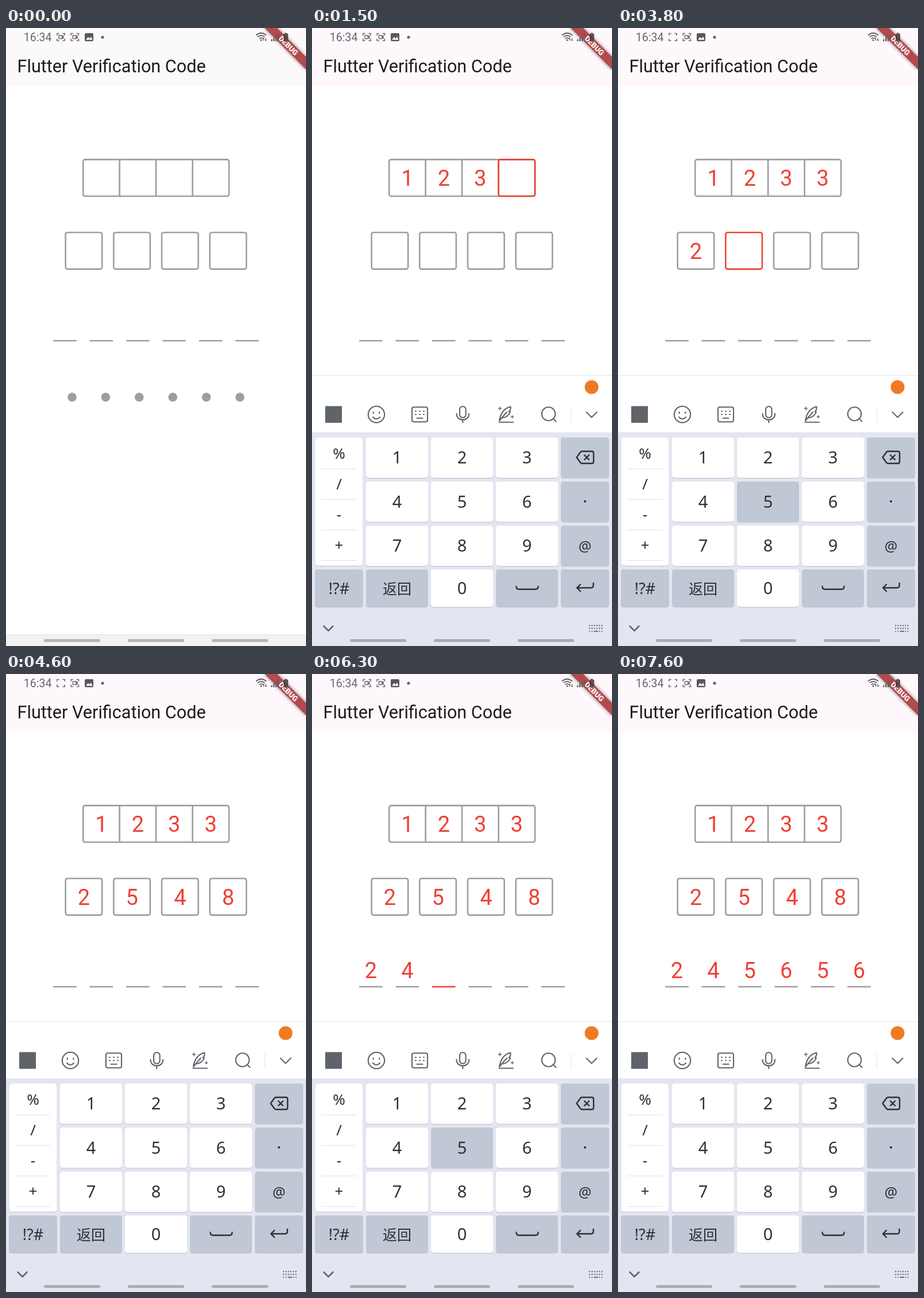
An HTML page for the animation above (8000 ms loop, 522 by 1073 pixels).

```html
<!DOCTYPE html>
<html lang="en">
<head>
<meta charset="utf-8">
<title>Flutter Verification Code</title>
<style>
html, body { margin: 0; height: 100%; overflow: hidden; background: #fff; }
svg { display: block; width: 100vw; height: 100vh; }
text { font-family: Roboto, sans-serif; }
.line { fill: none; stroke: #9e9e9e; stroke-width: 2.6; }
.focus { stroke: #ef4335; }
.code { font-size: 38px; fill: #ef4036; text-anchor: middle; }
.key { font: 29px "Noto Sans", sans-serif; fill: #2c2f36; text-anchor: middle; }
.han { font: 25px "Noto Sans CJK SC", "Noto Sans CJK", sans-serif; }
.icon { fill: none; stroke: #5f636a; stroke-width: 2.1; stroke-linecap: round; stroke-linejoin: round; }
.dark { stroke: #2c2f36; stroke-width: 2.4; }
</style>
</head>
<body>
<svg viewBox="0 0 522 1073" preserveAspectRatio="none">
  <defs>
    <filter id="blur" x="-20%" y="-100%" width="140%" height="300%"><feGaussianBlur stdDeviation="3"/></filter>
    <path id="corners" d="M88.8 13V9.5H92.5M98.5 9.5H102.2V13M102.2 18.5V22H98.5M92.5 22H88.8V18.5" fill="none" stroke="#6b6769" stroke-width="1.5"/>
    <path id="camera" d="M92 13H97.3V18.6H92ZM97.5 15.2L100 13.5V18L97.5 16.4" fill="none" stroke="#6b6769" stroke-width="1.4"/>
  </defs>
  <rect width="522" height="1073" fill="#fff"/>
  <rect id="bar" width="522" height="101"/>
  <text x="19.6" y="77" font-size="30.6" fill="#1d1b1e">Flutter Verification Code</text>

  <g transform="translate(522 0) rotate(45)">
    <rect x="-51" y="35.6" width="102" height="15.2" fill="#000" opacity=".5" filter="url(#blur)"/>
    <rect x="-75" y="35.6" width="150" height="15.2" fill="#b34a4c"/>
    <text y="47.9" font-size="13" font-weight="900" fill="#fff" text-anchor="middle">DEBUG</text>
  </g>

  <text x="30.8" y="23" font-size="19.5" fill="#69656a">16:34</text>
  <use href="#corners"/><use id="blink" href="#camera"/>
  <use href="#corners" x="24.3"/><use href="#camera" x="24.3"/>
  <rect x="137" y="9" width="15" height="14" rx="2" fill="#5a565a"/>
  <path d="M139 20.5L143 15.5L145.5 18.5L148 15L150.5 20.5Z" fill="#fff"/>
  <circle cx="168" cy="16" r="2.6" fill="#69656a"/>
  <g fill="none" stroke="#625e62" stroke-width="1.7">
    <path d="M435 12.5Q444 5 453 12.5M437.7 15.7Q444 10.3 450.3 15.7M440.5 18.7Q444 15.7 447.5 18.7"/>
    <path d="M448.6 22V17.5M447 19L448.6 17.2M452 17.5V22M453.6 20.5L452 22.2" stroke-width="1.3"/>
    <path d="M462.3 23V19.5M466.2 23V16.5M470.1 23V13M474 23V9.5" stroke-width="2.3"/>
  </g>
  <circle cx="444" cy="21" r="1.6" fill="#625e62"/>
  <path d="M485 8.5H489V10H491V23.5H483V10H485Z" fill="#4a3a3e" opacity=".85"/>

  <g id="fields"></g>
  <rect y="1053" width="522" height="20" fill="#f2f2f2"/>
  <path d="M0 1053.5H522" stroke="#e2e2e2"/>

  <g id="keyboard">
    <rect y="603" width="522" height="99" fill="#fff"/>
    <path d="M0 603.5H522M450.5 659V684" stroke="#e3e4e7"/>
    <rect y="702" width="522" height="400" fill="#e3e6f0"/>
    <circle cx="486.5" cy="623.5" r="12" fill="#f07a24"/>
    <rect x="23" y="656.5" width="29" height="29" fill="#5f636a"/>
    <g class="icon">
      <circle cx="112" cy="671" r="14.2"/>
      <path d="M106.7 667V669M117.3 667V669M106 675.5Q112 682 118 675.5"/>
      <rect x="174" y="658.3" width="27" height="25.5" rx="3"/>
      <path d="M180 665.5H181M187 665.5H188M194 665.5H195M180 671H181M187 671H188M194 671H195M182.5 677.5H192.5"/>
      <rect x="257" y="657" width="10.6" height="19.5" rx="5.3"/>
      <path d="M251.5 669.5C251.5 684 273.2 684 273.2 669.5M262.3 680.5V685"/>
      <path d="M325.5 684.5H350M326 682C328 669 335 660 345.5 657.5C346 661 345 664 342.5 666L345 666.5C343 672 338 676.5 330 677M326 682C331 676 335 671 339 667"/>
      <path d="M327 658V663M324.5 660.5H329.5M348.5 673V677M346.5 675H350.5" stroke-width="1.5"/>
      <circle cx="411.5" cy="670" r="11.7"/>
      <path d="M420 678.5L424.5 683M477.5 667L486.5 676L495.5 667"/>
      <path d="M20.5 1038.5L28.5 1046.5L36.500 1038.5" stroke-width="2.5"/>
      <path d="M483 1037.500H505M483 1042.500H505" stroke-width="2.3" stroke-dasharray="0 4.3"/>
      <path d="M483 1047.500H483.100M487.300 1047.500H487.400M491.500 1047.500H497M500.300 1047.500H500.400M504.500 1047.500H504.600" stroke-width="2"/>
    </g>
    <g id="keys"></g>
    <path d="M17 765.5H77M17 818.5H77M17 871.5H77M17 924.5H77" stroke="#e1e2e5"/>
    <g class="icon dark">
      <path d="M460.500 745.500L467 736.500Q468 735 470 735H487Q490 735 490 738V753Q490 756 487 756H470Q468 756 467 754.500ZM474 741.500L482 749.500M482 741.500L474 749.500"/>
      <path d="M355.500 969.500Q355.500 974.500 360 974.500H389Q393.500 974.500 393.500 969.500"/>
      <path d="M489.500 964V968Q489.500 972 485.500 972H461M467 966L461 972L467 978"/>
    </g>
    <circle cx="475" cy="822" r="2.1" fill="#2c2f36"/>
  </g>
  <g id="pills"></g>
</svg>
<script>
const $ = id => document.getElementById(id);
const LOOP = 8000;
// Typed digits per field: [digit, press time, release time]
const typing = [
  [[1, 900, 1000], [2, 1200, 1300], [3, 1400, 1500], [3, 1600, 1700]],
  [[2, 3600, 3700], [5, 3800, 3900], [4, 4100, 4200], [8, 4300, 4400]],
  [[2, 5800, 5900], [4, 6100, 6200], [5, 6300, 6400], [6, 6500, 6600], [5, 6800, 7000], [6, 7200, 7300]]
];
const range = n => [...Array(n).keys()];
const label = (x, y, s, cls) => `<text class="${cls}" x="${x}" y="${y}">${s}</text>`;
const box = (x, y, w, cls) => `<rect class="${cls}" x="${x}" y="${y}" width="${w}" height="63.6" rx="3.5"/>`;
const dash = (x, cls) => `<path class="${cls}" d="M${x} 543h40.6"/>`;

function key(x, y, w, h, fill, s = '', id = '', cls = 'key') {
  return `<rect x="${x}" y="${y + 1.3}" width="${w}" height="${h}" rx="4.5" fill="#c3c8d4"/>
    <rect ${id && `id="${id}"`} x="${x}" y="${y}" width="${w}" height="${h}" rx="4.5" fill="${fill}"/>`
    + label(x + w / 2, y + h / 2 + 10.3, s, cls);
}

function buildKeys() {
  const gray = '#c0c7d5', white = '#fff';
  let out = key(6, 711, 82, 222.5, white);
  ['%', '/', '-', '+'].forEach((s, i) => out += label(47, 748 + i * 53, s, 'key" style="font-size:26px'));
  for (let n = 1; n < 10; n++) {
    const c = (n - 1) % 3, r = (n - 1) / 3 | 0;
    out += key(94 + 113 * c, 711 + 76.5 * r, 108, 70, white, n, 'k' + n);
  }
  ['', '', '@'].forEach((s, r) => out += key(433, 711 + 76.5 * r, 84, 70, gray, s, '', 'key" style="font-size:25px'));
  out += key(5, 940, 84, 65, gray, '!?#', '', 'key" style="font-size:27px');
  out += key(94, 940, 108, 65, gray, '返回', '', 'key han');
  out += key(207, 940, 108, 65, white, 0);
  out += key(320, 940, 108, 65, gray);
  out += key(433, 940, 84, 65, gray);
  $('keys').innerHTML = out;
  $('pills').innerHTML = range(3).map(i =>
    `<rect x="${66 + 146 * i}" y="1061" width="98" height="5" rx="2.500"/>`).join('');
}

function drawFields(t) {
  const count = typing.map(row => row.filter(d => t >= d[2]).length);
  const active = typing.map((row, i) =>
    count[i] < row.length && (count[i] || (i === 0 && t >= 100)) ? count[i] : -1);
  let out = box(134.2, 228.4, 253.8, 'line');
  out += '<path class="line" d="M197.600 228.400v63.600M261.100 228.400v63.600M324.600 228.400v63.600"/>';
  if (active[0] >= 0) out += box(134.2 + 63.45 * active[0], 228.4, 63.5, 'line focus');
  const cls = (row, i) => active[row] === i ? 'line focus' : 'line';
  range(4).forEach(i => out += box(103.6 + 83.7 * i, 355, 63.6, cls(1, i)));
  range(6).forEach(i => {
    out += dash(82.2 + 63.4 * i, cls(2, i));
    out += `<circle cx="${115 + 58.4 * i}" cy="641" r="7.8" fill="#9e9e9e"/>`;
  });
  const first = [166, 135.5, 102.5], step = [63.4, 83.7, 63.4], base = [274, 401, 528];
  typing.forEach((row, r) => row.slice(0, count[r]).forEach((d, i) =>
    out += label(first[r] + step[r] * i, base[r], d[0], 'code')));
  $('fields').innerHTML = out;
}

let last = '';
function draw(now) {
  const t = now % LOOP;
  const hidden = ((t - 100) / 500 | 0) % 2;
  const p = Math.min(1, Math.max(0, (t - 100) / 400));
  $('blink').setAttribute('visibility', hidden ? 'hidden' : 'visible');
  $('bar').setAttribute('fill', t < 100 ? '#fcf9fb' : '#fef8fd');
  $('keyboard').setAttribute('transform', `translate(0 ${470 * (1 - p) ** 3})`);
  $('pills').setAttribute('fill', p > 0 ? '#abadb5' : '#b5b5b5');
  const pressed = typing.flat().find(d => t >= d[1] && t < d[2]);
  for (let n = 1; n < 10; n++)
    $('k' + n).setAttribute('fill', pressed && pressed[0] === n ? '#c0c7d5' : '#fff');
  const state = typing.flat().filter(d => t >= d[2]).length + ':' + (t >= 100);
  if (state !== last) drawFields(t);
  last = state;
  requestAnimationFrame(loop);
}
const start = performance.now();
function loop() { draw(performance.now() - start); }
buildKeys();
loop();
</script>
</body>
</html>
```
